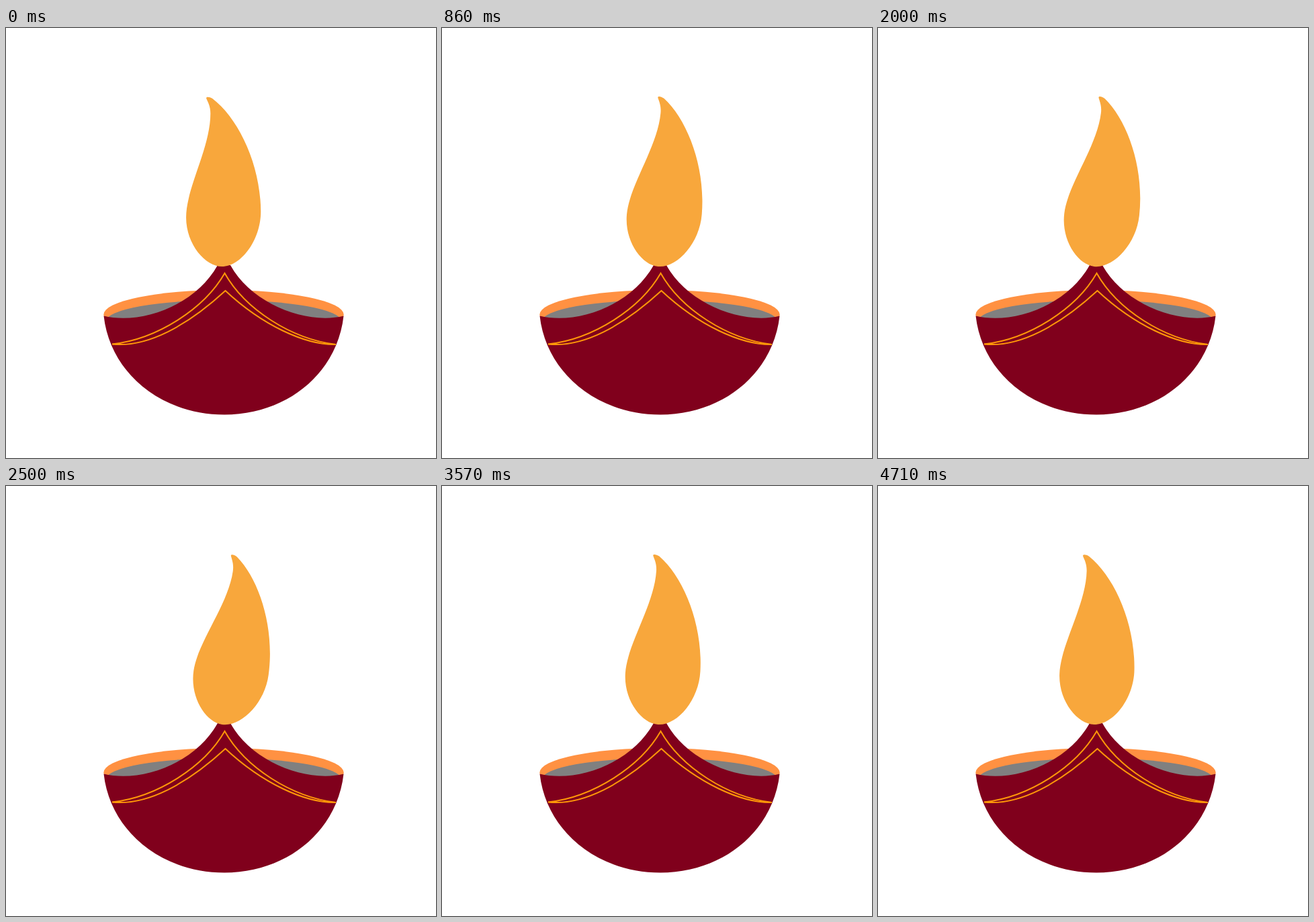
An HTML page for the animation above (4780 ms loop, 640 by 640 pixels).

```html
<!DOCTYPE html>
<html lang="en">
<head>
<meta charset="utf-8">
<title>Oil lamp</title>
<style>
  html, body { margin: 0; width: 100%; height: 100%; overflow: hidden; background: #fff; }
  svg { display: block; width: 100%; height: 100%; }
</style>
</head>
<body>
<svg viewBox="0 0 640 640">
  <ellipse cx="324" cy="426.5" rx="178.7" ry="36.5" fill="#ff9142"/>
  <ellipse cx="324" cy="436" rx="175" ry="31" fill="#808080"/>
  <path fill="#80001c" d="M145.5 428.5C200 442 281 414 315 353H334
    C366 411 448 442 502.5 428.5C493 514 418 575.5 325 575.5C232 575.5 155 514 145.5 428.5Z"/>
  <g fill="none" stroke="#ff9808" stroke-width="2">
    <path d="M158 470.5C225 463 295 418 325.5 365C356 419 425 463 491 471"/>
    <path d="M158 470.5C210 476 270 443 326.5 391C381 442 445 472 491 471"/>
  </g>
  <path id="flame" fill="#f8a73c" d="M299 105C298 102 303 102 308 105
    C346 134 379 202 379.5 272C380 315 350 355 321.5 355
    C297 355 268.3 322 268.3 282C268.3 238 305 178 305 127C305 116 301 110 299 105Z"/>
</svg>
<script>
  const LOOP = 4780, STEP = 1000 / 14;
  const SWAYS_PER_STEP = 0.1218, PEAK = 0.297, MIDDLE = 1.75, SWING = 6.6;
  const flame = document.getElementById('flame');
  const start = performance.now();

  function draw(now) {
    const time = Math.max(0, now - start) % LOOP;
    const step = Math.min(66, Math.floor((time + 5) / STEP));
    const angle = MIDDLE + SWING * Math.cos(2 * Math.PI * (step * SWAYS_PER_STEP - PEAK));
    flame.setAttribute('transform', `rotate(${angle} 322 355)`);
    requestAnimationFrame(draw);
  }
  draw(start);
</script>
</body>
</html>
```
